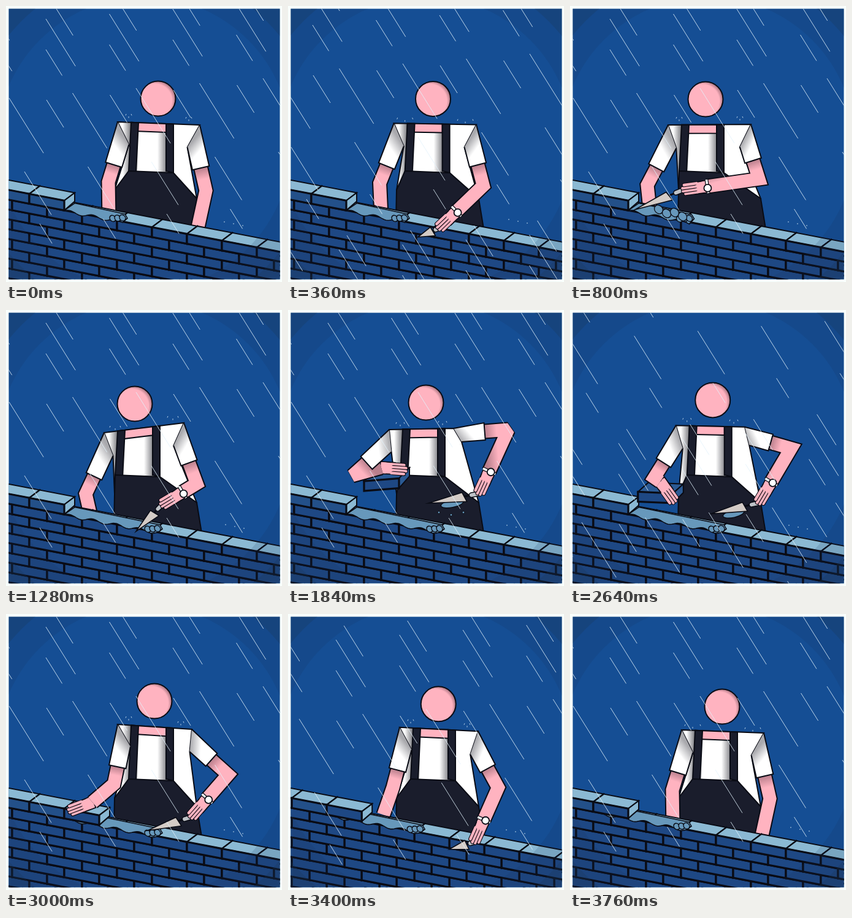
These frames come from a looping animation (450x450 px, 3800 ms). An HTML page with a canvas:

```html
<!DOCTYPE html>
<html lang="en">
<head>
<meta charset="utf-8">
<title>Bricklayer in the rain</title>
<style>
html, body { margin: 0; width: 100%; height: 100%; overflow: hidden; background: #f9fffc; }
canvas { display: block; }
</style>
</head>
<body>
<canvas id="stage" width="450" height="450"></canvas>
<script>
const ctx = document.getElementById('stage').getContext('2d');
const LOOP = 3800, STEP = 40, TAU = Math.PI * 2;
const INK = '#090b14', SKIN = '#ffb3c0', DENIM = '#1a1d2c', MORTAR = '#6798bb';
const SLOPE = 0.192, BRICK_W = 57, ROW_H = 16, WALL_Y = 299;

// joints of each pose; everything else on the figure is derived from them
const stand = {
  head: [248, 151], sl: [182, 189], sr: [316, 194],
  lElbow: [167, 287], lWrist: [168, 345], rElbow: [326, 301], rWrist: [312, 365], tip: [290, 410]
};
const scoop = {
  head: [221, 152], sl: [160, 194], sr: [295, 193],
  lElbow: [126, 292], lWrist: [130, 330], rElbow: [308, 282], rWrist: [224, 294], tip: [106, 332]
};
const spread = {
  head: [210, 153], sl: [160, 200], sr: [290, 184],
  lElbow: [130, 300], lWrist: [138, 335], rElbow: [311, 283], rWrist: [288, 297], tip: [212, 361]
};
const hold = {
  head: [225, 151], sl: [165, 195], sr: [270, 193],
  lElbow: [105, 270], lWrist: [152, 257], rElbow: [359, 195], rWrist: [328, 263], tip: [229, 315]
};
const lay = {
  head: [242, 142], sl: [182, 180], sr: [303, 188],
  lElbow: [176, 277], lWrist: [141, 307], rElbow: [362, 262], rWrist: [328, 301], tip: [231, 353]
};
const timeline = [[0, stand], [800, scoop], [1280, spread], [1840, hold],
  [2320, hold], [3000, lay], [3760, stand], [LOOP, stand]];

const clamp = v => Math.max(0, Math.min(1, v));
const mix = (a, b, k) => a + (b - a) * k;
const mixAll = (a, b, k) => a.map((v, i) => mix(v, b[i], k));
const wallY = x => WALL_Y + SLOPE * x;
const ease = (t, from, to) => {
  const k = clamp((t - from) / (to - from));
  return k * k * (3 - 2 * k);
};

function segment(t) {
  let i = 0;
  while (t >= timeline[i + 1][0]) i++;
  return i;
}

function poseAt(t) {
  const i = segment(t), [from, a] = timeline[i], [to, b] = timeline[i + 1], pose = {};
  for (const key in a) pose[key] = mixAll(a[key], b[key], ease(t, from, to));
  return pose;
}

function stroke(width, color = INK) {
  ctx.strokeStyle = color;
  ctx.lineWidth = width;
  ctx.stroke();
}

function trace(points) {
  ctx.beginPath();
  points.forEach(p => ctx.lineTo(...p));
}

function shape(points, fill, width = 2, open = false) {
  trace(points);
  if (!open) ctx.closePath();
  ctx.fillStyle = fill;
  ctx.fill();
  if (width) stroke(width);
}

function line(points, color, width) {
  trace(points);
  stroke(width, color);
}

function disc(x, y, r, fill, width = 2) {
  ctx.beginPath();
  ctx.arc(x, y, r, 0, TAU);
  ctx.fillStyle = fill;
  ctx.fill();
  if (width) stroke(width);
}

function ramp(a, b, ...stops) {
  const g = ctx.createLinearGradient(...a, ...b);
  stops.forEach(([k, c]) => g.addColorStop(clamp(k), c));
  return g;
}

function brick(x, y, slope, top, front) {
  ctx.save();
  ctx.transform(1, slope, 0, 1, x, y);
  shape([[0, 0], [17, -16], [BRICK_W + 17, -16], [BRICK_W, 0]], top);
  shape([[BRICK_W, 0], [BRICK_W + 17, -16], [BRICK_W + 17, -2], [BRICK_W, ROW_H]], top);
  shape([[0, 0], [BRICK_W, 0], [BRICK_W, ROW_H], [0, ROW_H]], front, 3.2);
  ctx.restore();
}

function wall() {
  for (let r = 10; r >= 0; r--) {
    const start = (r % 2 ? 10 : 38) - 2 * BRICK_W, end = r ? 560 : 60;
    for (let x = start; x < end; x += BRICK_W) {
      brick(x, wallY(x) + r * ROW_H, SLOPE, '#8bb9d3', r ? '#1e4884' : '#235089');
    }
  }
}

function mortar(end, heaped) {
  ctx.save();
  ctx.transform(1, SLOPE, 0, 1, 0, WALL_Y + ROW_H);
  const edge = [[95, 0], [112, -15], [end + 4, -13], [end + 8, -7]];
  for (let x = end; x > 98; x -= 3) edge.push([x, 1 + 2.5 * Math.sin(x / 6)]);
  shape(edge, MORTAR, 1.6);
  for (let i = 0; i < 3; i++) disc(end - 16 + i * 8, -2 - i * 2, 5, MORTAR, 1.4);
  for (let i = 0; heaped && i < 4; i++) disc(end - 50 + i * 13, -11 + i % 2 * 4, 7, MORTAR, 1.3);
  ctx.restore();
}

function hand([x, y], angle) {
  ctx.save();
  ctx.translate(x, y);
  ctx.rotate(angle);
  ctx.lineCap = 'round';
  shape([[-2, -10], [22, -10], [24, 9], [-2, 10]], SKIN, 1.8);
  for (let i = 0; i < 4; i++) {
    const row = -7 + i * 4.8, reach = 37 + 4 * Math.sin(i);
    line([[20, row], [reach, row]], INK, 6.6);
    line([[17, row], [reach, row]], SKIN, 4.4);
  }
  ctx.restore();
  line([[x, y], [x + 8 * Math.cos(angle), y + 8 * Math.sin(angle)]], SKIN, 18);
}

// side is -1 for the arm on the left of the picture, 1 for the right
function limb(corner, elbow, side) {
  const root = [corner[0] - side * 12, corner[1] + 10];
  const dx = elbow[0] - root[0], dy = elbow[1] - root[1], d = Math.hypot(dx, dy);
  const place = (along, out) => [
    root[0] + (dx * along + side * dy * out) / d,
    root[1] + (dy * along - side * dx * out) / d
  ];
  const hem = d * (side < 0 ? .68 : .62);
  return { hem: place(hem, 0), outer: place(hem, 14), inner: place(hem, -14), pit: place(24, -14) };
}

function arm(corner, elbow, wrist, side, inFront) {
  const { hem, outer, inner, pit } = limb(corner, elbow, side);
  const angle = Math.atan2(wrist[1] - elbow[1], wrist[0] - elbow[0]);
  if (inFront) hand(wrist, angle + (side < 0 ? .35 : 0));

  const skin = ramp(hem, elbow, [0, '#b97f8c'], [.5, SKIN], [1, SKIN]);
  ctx.save();
  ctx.miterLimit = 1.8;
  trace([hem, elbow, wrist]);
  stroke(25);
  stroke(21, skin);
  ctx.restore();

  if (inFront && side > 0) {
    const across = k => [wrist[0] - Math.sin(angle) * k, wrist[1] + Math.cos(angle) * k];
    line([across(-11), across(11)], INK, 6);
    line([across(-11), across(11)], '#fff', 3.5);
    disc(...across(-3), 6, '#fff', 1.8);
  }
  const cloth = ramp(outer, pit, [0, '#fff'], [.6, '#fff'], [1, '#a9a9ad']);
  shape([corner, outer, inner, pit], cloth, 2, true);
}

function body({ sl, sr, lElbow, rElbow }) {
  const a = sl[0] + 22, b = a + 57, waist = 269;
  const hipL = [177, 300], hipR = [311, 314];
  const span = sr[0] - sl[0], at = x => (x - sl[0]) / span;
  const top = (x, drop = 0) => [x, mix(sl[1], sr[1], at(x)) + drop];

  const cloth = ramp([sl[0], 0], [sr[0], 0], [0, '#fff'], [at(a - 14), '#fff'], [at(a), '#77777c'],
    [at(a + 12), '#fff'], [at(b - 14), '#fff'], [at(b), '#89898e'], [at(b + 12), '#fff']);
  shape([sl, sr, limb(sr, rElbow, 1).pit, hipR, [270, 325], hipL, limb(sl, lElbow, -1).pit], cloth);
  shape([top(a), top(b), top(b, 14), top(a, 14)], SKIN);
  for (const [x, low] of [[a, a - 4], [b, b]]) {
    shape([top(x), top(x + 12), [low + 12, waist + 3], [low, waist]], DENIM);
  }
  shape([[a - 4, waist], [b + 12, waist + 3], hipR, [325, 400], [175, 400], hipL], DENIM);
}

function head([x, y]) {
  const g = ctx.createRadialGradient(x - 6, y + 4, 20, x - 4, y + 3, 35);
  g.addColorStop(0, SKIN);
  g.addColorStop(.5, SKIN);
  g.addColorStop(1, '#8d5f6b');
  disc(x, y, 28.5, g);
}

function trowel(wrist, elbow, tip, loaded) {
  const reach = Math.atan2(wrist[1] - elbow[1], wrist[0] - elbow[0]);
  const x = wrist[0] + 40 * Math.cos(reach), y = wrist[1] + 40 * Math.sin(reach);
  const n = Math.hypot(tip[0] - x, tip[1] - y);
  ctx.save();
  ctx.translate(x, y);
  ctx.rotate(Math.atan2(tip[1] - y, tip[0] - x));
  ctx.lineCap = 'round';
  if (loaded) {
    ctx.beginPath();
    ctx.ellipse(n * .55, -8, n * .22, 6, 0, 0, TAU);
    ctx.fillStyle = MORTAR;
    ctx.fill();
    stroke(1.4);
  }
  line([[0, 0], [n * .34, 0]], INK, 3);
  shape([[n * .26, -9], [n * .32, 7], [n, 0]], '#d3cbc6', 1.6);
  line([[0, 0], [n * .15, 0]], INK, 9);
  line([[0, 0], [n * .15, 0]], '#bfc3c8', 6);
  ctx.restore();
}

function vignette() {
  for (const [r, alpha] of [[240, .15], [283, .25]]) {
    ctx.beginPath();
    ctx.rect(0, 0, 450, 450);
    ctx.arc(225, 225, r, 0, TAU, true);
    ctx.fillStyle = `rgba(24,52,86,${alpha})`;
    ctx.fill();
  }
}

// one column of streaks (x, y, length), repeated sideways and wrapped along the fall
const streaks = [[65, 21, 91], [65, 71, 50], [66, 153, 53], [5, 150, 106],
  [78, -2, 59], [30, 270, 83], [55, 355, 38]];

function rain(t) {
  const i = segment(t), from = timeline[i][0], to = timeline[i + 1][0];
  const fall = (t - from) / (to - from) * Math.max(1, Math.round((to - from) / 500)) % 1;
  ctx.beginPath();
  for (const [x, y, n] of streaks) {
    for (let col = -6; col < 8; col++) {
      for (const lap of [fall - 1, fall]) {
        const px = x + col * 103.5 + lap * 250, py = y - col * 8 + lap * 400;
        ctx.moveTo(px, py);
        ctx.lineTo(px + n * .53, py + n * .848);
      }
    }
  }
  stroke(1, 'rgba(226,242,252,.82)');
}

function splashes({ sl, sr }, t) {
  const beat = t / STEP % 5;
  for (let i = -1; i < 2; i++) {
    for (const [x, y] of [[sl[0] + 18, sl[1]], [sr[0] - 18, sr[1]]]) {
      const px = x + i * (4 + beat * 2), py = y - 9 - (i & 1) * 4 + beat;
      line([[px, py], [px + i, py + 2.5]], 'rgba(215,236,250,.8)', 1);
    }
    disc(371 + i * 15 + beat, 355 + i * 3 - beat, .8, '#cfe6f4', 0);
  }
}

function carriedBrick(t) {
  const lift = ease(t, 1280, 1840), drop = ease(t, 2320, 3000);
  const held = mixAll([125, 350, 0], [124, 279, -.08], lift);
  const [x, y, slope] = mixAll(held, [95, wallY(95), SLOPE], drop);
  brick(x, y, slope, drop > .75 ? '#8bb9d3' : '#2b5a94', '#1e4884');
}

function draw(t) {
  const p = poseAt(t);
  const scroll = BRICK_W * ease(t, 3120, 3640);
  const above = ([x, y]) => y < wallY(x) - 12;
  const leftFront = above(p.lWrist), rightFront = above(p.rWrist);
  const brickFront = t >= 1560;
  const leftArm = () => arm(p.sl, p.lElbow, p.lWrist, -1, leftFront);
  const rightArm = () => arm(p.sr, p.rElbow, p.rWrist, 1, rightFront);

  ctx.fillStyle = '#f9fffc';
  ctx.fillRect(0, 0, 450, 450);
  ctx.save();
  ctx.beginPath();
  ctx.rect(4.5, 4.5, 442, 441);
  ctx.clip();
  ctx.fillStyle = '#154e94';
  ctx.fillRect(0, 0, 450, 450);

  body(p);
  if (!leftFront) leftArm();
  if (!rightFront) rightArm();
  head(p.head);
  if (t > 1280 && !brickFront) carriedBrick(t);

  ctx.save();
  ctx.translate(-scroll, -scroll * SLOPE);
  wall();
  mortar(mix(190, 247, ease(t, 700, 1280)), t > 400 && t < 1080);
  if (brickFront) carriedBrick(t);
  ctx.restore();

  if (leftFront) leftArm();
  if (rightFront) {
    trowel(p.rWrist, p.rElbow, p.tip, t > 1480 && t < 2720);
    rightArm();
  }
  if (t > 1700 && t < 2000) {
    for (let i = 0; i < 3; i++) disc(246 + i * 20, 330 + (t - 1840) / 12 + i % 2 * 4, 2, MORTAR, 1);
  }
  vignette();
  splashes(p, t);
  rain(t);
  ctx.restore();
}

function tick() {
  draw(Math.floor(performance.now() % LOOP / STEP) * STEP);
  requestAnimationFrame(tick);
}
tick();
</script>
</body>
</html>
```
